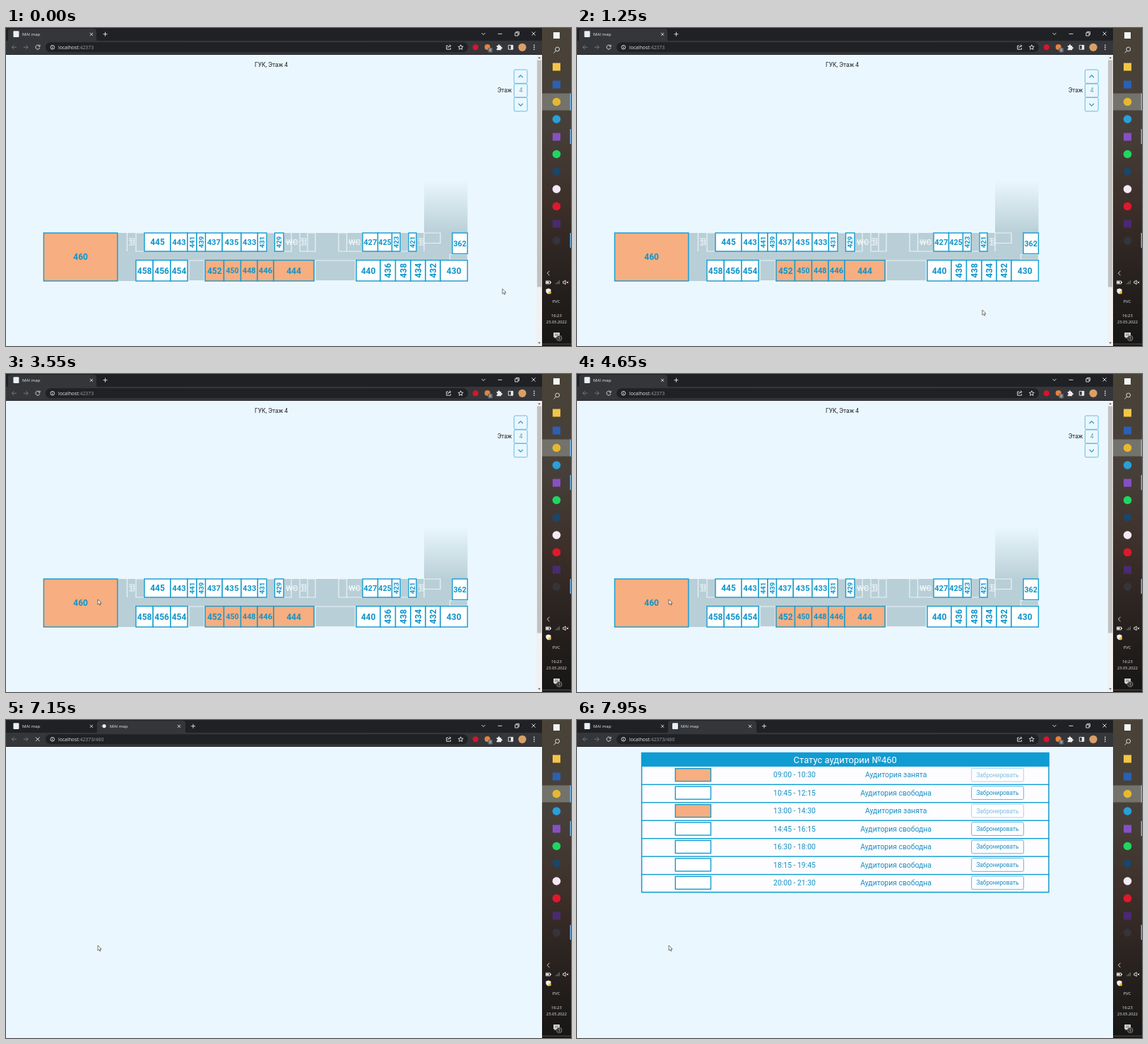
These frames come from a looping animation (800 by 450 pixels, 8000 ms). An HTML page:

```html
<!DOCTYPE html>
<html lang="ru">
<head>
<meta charset="utf-8">
<title>MAI map</title>
<style>
html, body { margin: 0; width: 100%; height: 100%; overflow: hidden; background: #ebf7fe; }
svg { display: block; width: 800px; height: 450px; }
.ui { font-family: "Open Sans", "Noto Sans", sans-serif; fill: #e8eaed; }
.page { font-family: Roboto, sans-serif; fill: #212529; }
.line { fill: none; stroke: #e8eaed; stroke-width: .9; }
.dim { stroke: #7b7d81; }
.plan { fill: none; stroke: #e9f3f7; stroke-width: 1.2; }
.room { fill: #fff; stroke: #139bd0; stroke-width: 1.4; }
.busy { fill: #f7ae80; }
.num { font-weight: 700; fill: #1095cb; }
.ctl { fill: #ebf7fe; stroke: #55b6dc; stroke-width: .9; }
.blue { fill: #1990c2; }
</style>
</head>
<body>
<svg id="stage" viewBox="0 0 800 450"></svg>
<script>
const LOOP = 8000, OPEN = 5350, COMMIT = 6900, READY = 7400;

const rect = (x, y, w, h, attrs = '') => `<rect x="${x}" y="${y}" width="${w}" height="${h}" ${attrs}/>`;
const disc = (x, y, r, fill) => `<circle cx="${x}" cy="${y}" r="${r}" fill="${fill}"/>`;
const path = (d, cls = 'line', attrs = '') => `<path class="${cls}" d="${d}" ${attrs}/>`;
const text = (s, x, y, size, attrs = '') => `<text x="${x}" y="${y}" font-size="${size}" ${attrs}>${s}</text>`;
const mid = (s, x, y, size, attrs = '') => text(s, x, y, size, 'text-anchor="middle" ' + attrs);
const group = (id, body, attrs = '') => `<g id="${id}" ${attrs}>${body}</g>`;
const cross = (x, y, r) => path(`M${x - r} ${y - r}l${2 * r} ${2 * r}m0 ${-2 * r}l${-2 * r} ${2 * r}`);

// Browser window
const tabShape = x => path(`M${x - 3} 18.5q3 0 3-3V5q0-4 4-4h117q4 0 4 4v10.5q0 3 3 3z`, '', 'fill="#35363a"');
const favicon = x => rect(x, 4.3, 8, 8.8, 'rx="1" fill="#e9f0f6"');
const plus = x => path(`M${x - 3} 8.7h6m-3-3v6`, 'line', 'stroke-width="1.1"');

function browser() {
  return rect(0, 0, 759, 38, 'fill="#202124"') + rect(0, 18, 759, 19.5, 'fill="#35363a"')
    + group('oneTab', tabShape(3) + plus(140.5))
    + group('twoTabs', tabShape(129) + plus(265) + cross(245, 8.8, 2))
    + favicon(10.4) + text('MAI map', 23, 11, 6.1) + cross(121, 8.8, 2)
    + group('newIcon', favicon(135)) + group('throbber', '')
    + text('', 147, 11, 6.1, 'id="newTitle"')
    + path('M673.5 7l2.5 2.5 2.5-2.5M696.5 8.3h6M720.8 6.8h4.2v4.2h-4.2zM722.2 6.5v-1.2h4.2v4.2h-1.2') + cross(747, 8, 2.6)
    + path('M14.7 27.2H8.3m3-3l-3 3 3 3M24.8 27.2h6.4m-3-3l3 3-3 3', 'line dim')
    + group('reload', path('M47.3 25.2a3 3 0 1 0 .6 2.6M48 23.7v2.4h-2.4'))
    + group('stop', cross(44.8, 27.2, 2.8))
    + rect(56, 20.3, 598, 14, 'rx="7" fill="#202124"')
    + '<circle class="line" cx="65.8" cy="27.3" r="2.8" stroke-width=".7"/>' + path('M65.8 26.8v2.2m0-3.6v.8', 'line', 'stroke-width=".7"')
    + `<text x="74" y="29.8" font-size="6.85">localhost<tspan fill="#9aa0a6">:42373<tspan id="route"></tspan></tspan></text>`
    + path('M626 25h-2.3v5.2h5.8v-2M625.5 28.3q.4-3 4-3m-1.5-1.8l1.8 1.8-1.8 1.8')
    + path('M643.8 23.8l1 2.3 2.5.2-1.9 1.6.6 2.5-2.2-1.3-2.2 1.3.6-2.5-1.9-1.6 2.5-.2z', 'line', 'stroke-width=".8"')
    + disc(664.8, 27.3, 4, '#d9152a') + disc(681.6, 27, 4, '#e9813a')
    + group('badge', rect(682.5, 28, 6.4, 6.6, 'rx="1.3" fill="#63676c"') + mid('8', 685.7, 33.4, 5.6))
    + path('M694.7 25h2v-.6a1.2 1.2 0 0 1 2.4 0v.6h2v2h.5a1.2 1.2 0 0 1 0 2.4h-.5v1.8h-6.4v-2a1.2 1.2 0 0 0 0-2.4z', '')
    + path('M711.3 24.4h6.4v5.8h-6.4z') + rect(714.8, 24, 3.3, 6.5)
    + disc(731, 27.3, 5.6, '#d9a066')
    + [24.3, 27.2, 30.1].map(y => disc(747.8, y, .85, '#e8eaed')).join('');
}

// Taskbar
const app = (shape, y, color) => shape === 'o' ? disc(779.5, y, 5.8, color) : rect(774, y - 5.5, 11, 11, `fill="${color}"`);

function taskbar() {
  return rect(759, 0, 41, 450, 'fill="url(#bar)"')
    + rect(759, 92.5, 41, 24, 'fill="#73736b"')
    + [92.5, 143, 290].map((y, i) => rect(798.6, y, 1.4, i ? 21 : 24, 'fill="#76b9ed"')).join('')
    + rect(775, 6, 9, 9, 'fill="#f4f4f4"')
    + '<circle class="line" cx="780.7" cy="30" r="2.9"/>' + path('M778.6 32.2l-3 3.2')
    + app('s', 55, '#f5c548') + app('s', 80, '#2b60b4') + app('o', 104.5, '#e6b832') + app('o', 129, '#2a9fd8')
    + app('s', 154, '#8650c4') + app('o', 178.5, '#1ed760') + app('o', 203, '#1b4668') + app('o', 228, '#f3eaf5')
    + app('o', 252.3, '#e0182d') + app('s', 277, '#4a2a70') + app('o', 301, '#34343a')
    + path('M769.5 343.8l-3.2 3.2 3.2 3.2')
    + path('M764.5 358h6v4h-6zM771.5 359v2', 'line', 'stroke-width=".8"') + rect(765.2, 358.5, 3.5, 3)
    + path('M778.3 362.5v-1.2m1.7 1.2v-2.6m1.7 2.6v-4m1.7 4v-5.4', 'line dim')
    + path('M788.8 358.6h1.3l2-1.7v6l-2-1.7h-1.3zM793.7 358.6l2.5 2.6m0-2.6l-2.5 2.6', 'line', 'stroke-width=".8"')
    + path('M768 368.5l3.5 1.2v2.5q0 3-3.5 4.3-3.5-1.3-3.5-4.3v-2.5z', '', 'fill="#f2f2ee"') + disc(770, 374.4, 2, '#f1b82c')
    + mid('РУС', 779, 389.3, 5.8) + mid('16:23', 779.3, 409.2, 5.8) + mid('23.05.2022', 779.4, 418.3, 5.7)
    + path('M775.3 431h8.6v6.6h-5l-2 2v-2h-1.6z', '') + path('M776.8 433h5.6m-5.6 2h5.6', '', 'stroke="#333" stroke-width=".7"')
    + '<circle cx="783.3" cy="439" r="3.8" fill="#333" stroke="#aaa" stroke-width=".6"/>' + mid('1', 783.3, 441, 5.4)
    + rect(759, 446.8, 41, .7, 'fill="#77716b"');
}

// Floor plan: each room is "number/width/font size", v = vertical label, * = occupied, _ = gap
function row(x, y, h, list) {
  return list.split(' ').map(item => {
    const [label, w, size] = item.replace(/[v*_]/g, '').split('/').map(Number);
    const cx = x + w / 2, cy = y + h / 2;
    const box = item[0] === '_' ? '' : rect(x, y, w, h, `class="room ${item.includes('*') ? 'busy' : ''}"`)
      + mid(label, cx, cy + size * .36, size, `class="num" ${item[0] === 'v' ? `transform="rotate(-90 ${cx} ${cy})"` : ''}`);
    x += w;
    return box;
  }).join('');
}
const stairs = x => path(`M${x} 298h7.5v9h-7.5m0-6h3v-3m0 6h4.5m-4.5 3v-6h4.5`, 'plan', 'stroke-width=".9"');
const wc = x => mid('WC', x, 307, 11, 'font-weight="500" fill="#f3f8fa"') + path(`M${x - 9} 303h18`, 'plan', 'stroke-width=".7"');
const chevron = (y, d) => path(`M725.5 ${y}l3.2 ${d} 3.2 ${-d}`, 'line', 'style="stroke:#2497cc;stroke-width:1.1"');

function map() {
  return mid('ГУК, Этаж 4', 375.5, 55.2, 8.5)
    + text('Этаж', 695.7, 91, 8.33)
    + [59, 79, 98.5].map((y, i) => rect(719.3, y, 18.8, i === 1 ? 19 : 19.3, 'rx="1.8" class="ctl"')).join('')
    + chevron(70, -3.2) + chevron(107, 3.2) + mid('4', 729, 91.3, 8.33, 'style="fill:#5a9db8"')
    + rect(592, 215, 61.5, 75, 'fill="url(#fade)"')
    + rect(158, 290, 495.5, 68, 'fill="#b9cfd7"')
    + path('M171.5 290v26M184 290v26h11.5M195 290h-11M259 329h22v28.5h-22zM369 316v-26h11M393 316h11v-26M416 290v26h22v-26h-11v26'
      + 'M471 290v26h34M482.5 290v26M471 290h11M438 329h56.5v28.5H438zM558.5 290v26h11v-26M592 290v26M592 290h23v14.5h-23zM628.5 320.5h25v7.5h-25z', 'plan')
    + [174, 417, 584].map(stairs).join('') + wc(404.7) + wc(493.5)
    + row(53.4, 290, 68, '460*/104.4/12')
    + row(196, 290, 26, '445/37/12 443/24/11.4 v441/13/9.6 v439/12.5/9.6 437/23.7/11.2 435/26.8/11.6 433/23.4/11.2 v431/12.6/9.6 _/11.5/0 v429/12.5/9.6 _/112/0 427/21.5/11.1 425/20/10.7 v423/11.6/9.6 _/11.9/0 v421/11/9.6')
    + row(632, 290, 29.5, '362/21.4/10.8')
    + row(184, 328.6, 29.4, '458/24.2/12 456/24.8/12 454/24/12 _/25/0 452*/26.5/12 450*/24/10.5 448*/23.5/10.8 446*/23/11.4 444*/57/12 _/60/0 440/34/12 v436/21.5/12 v438/21.5/12 v434/21/12 v432/21/12 430/38.4/12')
    + rect(751, 37.5, 8, 412.5, 'fill="#f1f1f1"') + rect(752, 45.5, 6.2, 321, 'fill="#c1c1c1"')
    + path('M753.2 43l1.9-2 1.9 2z', '', 'fill="#505050"') + path('M753.2 444.7l1.9 2 1.9-2z', '', 'fill="#505050"');
}

// Timetable
function table() {
  const hours = ['09:00 - 10:30', '10:45 - 12:15', '13:00 - 14:30', '14:45 - 16:15', '16:30 - 18:00', '18:15 - 19:45', '20:00 - 21:30'];
  const step = 25.45;
  return rect(91.6, 46.5, 576.4, 197.2, 'fill="#fdfcff" stroke="#0f9cd2" stroke-width="1.5"')
    + rect(91, 46, 577.6, 20, 'fill="#0f9cd2"')
    + mid('Статус аудитории №460', 379.7, 60.6, 13, 'style="fill:#fff"')
    + hours.map((h, i) => {
      const y = 65.5 + i * step, busy = i === 0 || i === 2;
      return (i ? rect(91, y - .3, 577.6, 1.4, 'fill="#0f9cd2"') : '')
        + rect(139.3, y + 3.2, 50.2, 18, `class="room ${busy ? 'busy' : ''}"`)
        + mid(h, 308, y + 15.9, 10.4, 'class="blue"')
        + mid('Аудитория ' + (busy ? 'занята' : 'свободна'), 451.6, y + 15.9, 10.4, 'class="blue"')
        + `<g opacity="${busy ? .55 : 1}">` + rect(558.6, y + 2.8, 73.8, 18.8, 'rx="2" fill="#fdfcff" stroke="#4cb3dc" stroke-width=".9"')
        + mid('Забронировать', 595.5, y + 15.1, 8.33, 'class="blue"') + '</g>';
    }).join('');
}

const gradient = (id, stops) => `<linearGradient id="${id}" x2="0" y2="1">`
  + stops.map(([o, c, a = 1]) => `<stop offset="${o}" stop-color="${c}" stop-opacity="${a}"/>`).join('') + '</linearGradient>';

stage.innerHTML = '<defs>'
  + gradient('bar', [[0, '#494237'], [.3, '#47403a'], [.55, '#3d2f29'], [.75, '#2a2320'], [1, '#171615']])
  + gradient('fade', [[0, '#b9cfd7', 0], [1, '#b9cfd7']]) + '</defs>'
  + rect(0, 0, 800, 450, 'fill="#ebf7fe"')
  + group('map', map(), 'class="page"') + group('table', table(), 'class="page"')
  + `<g class="ui">${browser()}${taskbar()}</g>`
  + group('cursor', path('M0 0V7.2L1.7 5.7 2.8 8.1 4 7.6 3 5.2H5.1Z', '', 'fill="#fff" stroke="#222" stroke-width=".6"'));

const $ = id => document.getElementById(id);
const show = (id, on) => $(id).style.display = on ? '' : 'none';

// Cursor keys: time, x, y; smoothed with Hermite tangents
const keys = [[0, 703, 369], [1250, 574, 399], [2600, 305, 369], [3400, 130, 319]];
function slope(i, k) {
  const a = keys[Math.max(i - 1, 0)], b = keys[Math.min(i + 1, keys.length - 1)];
  return (b[k] - a[k]) / (b[0] - a[0]);
}
function cursorAt(t) {
  const i = keys.findIndex((key, n) => n && t < key[0]) - 1;
  if (i < 0) return keys[keys.length - 1].slice(1);
  const a = keys[i], b = keys[i + 1], d = b[0] - a[0], u = (t - a[0]) / d, v = 1 - u;
  return [1, 2].map(k => v * v * (1 + 2 * u) * a[k] + u * u * (3 - 2 * u) * b[k]
    + d * u * v * (v * slope(i, k) - u * slope(i + 1, k)));
}

function spinner(t) {
  const loading = t >= COMMIT, s = t - (loading ? 7150 : OPEN);
  const from = loading ? 175 + s * .27 : -100 - s * .3;
  const sweep = loading ? 12 + 250 * Math.abs(Math.sin(s * Math.PI / 1333)) : 8 + 100 * Math.min(s / 400, 1);
  const at = deg => `${139 + 3.7 * Math.cos(deg * Math.PI / 180)} ${8.6 + 3.7 * Math.sin(deg * Math.PI / 180)}`;
  const arc = path(`M${at(from)}A3.7 3.7 0 ${sweep > 180 ? 1 : 0} 1 ${at(from + sweep)}`, 'line', `style="stroke:${loading ? '#8ab4f8' : '#85888c'}"`);
  return arc + (loading ? disc(139, 8.6, 2.6, '#e9f0f6') : '');
}

function draw() {
  const t = performance.now() % LOOP;
  const opened = t >= OPEN, named = t >= COMMIT, ready = t >= READY, busy = opened && !ready;
  show('map', !opened);
  show('oneTab', !opened);
  show('twoTabs', opened);
  show('table', ready);
  show('newIcon', ready);
  show('reload', !busy);
  show('stop', busy);
  show('badge', !opened || named);
  $('newTitle').textContent = !opened ? '' : named ? 'MAI map' : 'Загрузка...';
  $('route').textContent = opened ? '/460' : '';
  $('throbber').innerHTML = busy ? spinner(t) : '';
  $('cursor').setAttribute('transform', `translate(${cursorAt(t)})`);
  requestAnimationFrame(draw);
}
draw();
</script>
</body>
</html>
```
